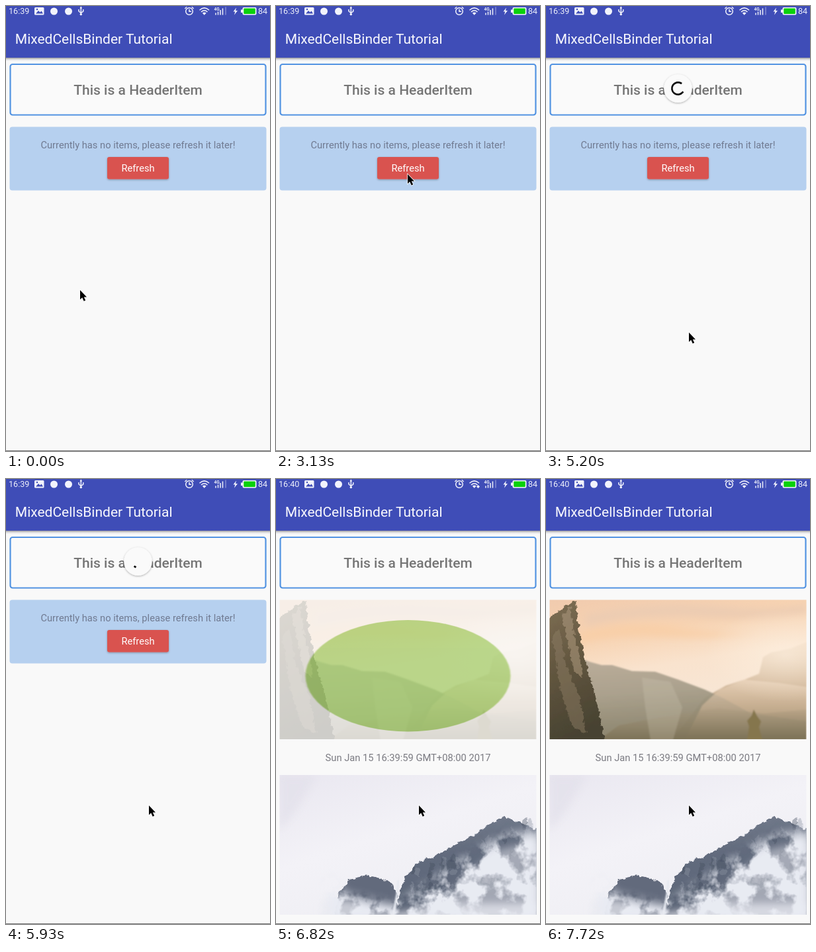
An HTML page for the animation above (8000 ms loop, 399x672 px).

```html
<!DOCTYPE html>
<html lang="en">
<head>
<meta charset="utf-8">
<title>List refresh</title>
<style>
  html, body { margin: 0; width: 100%; height: 100%; overflow: hidden; background: #f9f9f9; }
  svg { display: block; width: 100%; height: 100%; }
  text { font-family: Roboto, "Noto Sans", sans-serif; font-size: 14.7px; }
  .mid { text-anchor: middle; }
  .status text { font-size: 12.6px; fill: #eceefa; }
  .line { fill: none; stroke: #f2f3fc; stroke-width: 1.5; }
</style>
</head>
<body>
<svg viewBox="0 0 399 672">
  <defs>
    <linearGradient id="barShade" x2="0" y2="1">
      <stop stop-color="#8f8f96"/><stop offset=".4" stop-color="#d4d4d6"/><stop offset="1" stop-color="#f9f9f9"/>
    </linearGradient>
    <linearGradient id="sky" x2=".3" y2="1">
      <stop stop-color="#f1cbae"/><stop offset=".3" stop-color="#f7d3b2"/><stop offset=".55" stop-color="#f9e3ce"/><stop offset="1" stop-color="#f6e8da"/>
    </linearGradient>
    <linearGradient id="cliff" x2=".2" y2="1">
      <stop stop-color="#7f6f55"/><stop offset=".5" stop-color="#62563f"/><stop offset="1" stop-color="#474231"/>
    </linearGradient>
    <linearGradient id="ridge" x2=".2" y2="1">
      <stop stop-color="#b7aa98"/><stop offset=".45" stop-color="#a59c88"/><stop offset="1" stop-color="#827c64"/>
    </linearGradient>
    <linearGradient id="wall" x2="0" y2="1">
      <stop stop-color="#f2dcc5"/><stop offset=".4" stop-color="#d3b99c"/><stop offset="1" stop-color="#978769"/>
    </linearGradient>
    <linearGradient id="floor" x2="0" y2="1">
      <stop stop-color="#a39378" stop-opacity=".2"/><stop offset="1" stop-color="#7b7156"/>
    </linearGradient>
    <radialGradient id="glow">
      <stop stop-color="#fff3e4" stop-opacity=".6"/><stop offset="1" stop-color="#fff0de" stop-opacity="0"/>
    </radialGradient>
    <linearGradient id="mist" x2=".6" y2="1">
      <stop stop-color="#e9e7f0"/><stop offset=".5" stop-color="#f3f2f7"/><stop offset="1" stop-color="#eeeef3"/>
    </linearGradient>
    <linearGradient id="rock" x2=".2" y2="1">
      <stop stop-color="#767e8f"/><stop offset=".4" stop-color="#626b7d"/><stop offset="1" stop-color="#596375"/>
    </linearGradient>
    <filter id="soft1"><feGaussianBlur stdDeviation="1"/></filter>
    <filter id="soft6" x="-50%" y="-50%" width="200%" height="200%"><feGaussianBlur stdDeviation="6"/></filter>
    <filter id="rough">
      <feTurbulence type="fractalNoise" baseFrequency=".12" numOctaves="3" seed="4"/>
      <feDisplacementMap in="SourceGraphic" scale="9" xChannelSelector="R" yChannelSelector="G"/>
      <feGaussianBlur stdDeviation=".7"/>
    </filter>
    <filter id="wisps" color-interpolation-filters="sRGB">
      <feTurbulence type="fractalNoise" baseFrequency=".035" numOctaves="4" seed="9"/>
      <feColorMatrix values="0 0 0 0 .91  0 0 0 0 .92  0 0 0 0 .95  5 0 0 0 -1.9" result="noise"/>
      <feGaussianBlur in="SourceGraphic" stdDeviation="8"/>
      <feComposite in="noise" operator="in"/>
    </filter>
    <filter id="lift" x="-30%" y="-30%" width="160%" height="160%">
      <feDropShadow dx="0" dy="1" stdDeviation="1.4" flood-opacity=".32"/>
    </filter>
    <clipPath id="top"><rect x="5.5" y="182.5" width="388" height="210.5"/></clipPath>
    <clipPath id="low"><rect x="5.5" y="447" width="388" height="211"/></clipPath>
  </defs>

  <rect width="399" height="672" fill="#f9f9f9"/>
  <rect x="6.5" y="88" width="386" height="76.5" rx="3.5" fill="#fafafa" stroke="#5293e2" stroke-width="2.2"/>
  <text class="mid" x="199.5" y="134" fill="#757575" style="font-size:21px;font-weight:500">This is a HeaderItem</text>

  <g id="empty">
    <rect x="5.5" y="182.5" width="388" height="96" rx="4" fill="#b6d0ef"/>
    <text class="mid" x="199.5" y="215" fill="#707a91">Currently has no items, please refresh it later!</text>
    <rect x="153" y="228" width="93" height="33.5" rx="3" fill="#d9534f" filter="url(#lift)"/>
    <text class="mid" x="199.5" y="250.3" fill="#fff">Refresh</text>
  </g>

  <g id="items">
    <g clip-path="url(#top)">
      <g id="holder"><circle cx="199.5" cy="305" r="155" fill="#8fc54b" filter="url(#soft1)"/></g>
      <g id="valley">
        <rect x="5" y="182" width="389" height="212" fill="url(#sky)"/>
        <g filter="url(#soft6)">
          <path d="M60 205Q150 185 260 192Q330 200 394 190V203Q300 215 220 208Q130 205 60 222Z" fill="#ecccb2"/>
          <path d="M50 232Q120 212 200 224T330 232Q250 242 170 238T50 248Z" fill="#f9cfa6" opacity=".8"/>
        </g>
        <g filter="url(#soft1)">
          <path d="M394 246L370 256 340 262 328 269 322 294 300 303 272 312 240 330 190 394H394Z" fill="url(#wall)"/>
          <path d="M50 270L66 276 84 281 100 281 130 290 165 291 200 303 240 318 270 332 310 354 394 366V394H50Z" fill="url(#ridge)" opacity=".93"/>
          <path d="M210 394L236 342 262 318 300 303 352 308 394 314V394Z" fill="url(#wall)" opacity=".6"/>
          <path d="M80 394L110 372 160 362 215 352 260 346 330 354 394 348V394Z" fill="url(#floor)"/>
          <path d="M145 300L188 306 206 345 192 394H158L150 345Z" fill="#d2c9b6" opacity=".25"/>
          <path d="M304 394L307 374 304 365 311 357 314 348 319 358 325 366 322 375 327 394Z" fill="#85764e"/>
        </g>
        <g filter="url(#rough)">
          <path d="M0 212L18 201 31 190 45 183 47 214 54 250 62 284 76 334 90 400H0Z" fill="url(#cliff)"/>
          <path d="M24 206L38 192 41 225 50 262 56 300 43 290 31 240Z" fill="#a9947a" opacity=".6"/>
          <path d="M10 235L20 226 30 280 50 330 61 385 37 372 18 300Z" fill="#8c7c64" opacity=".5"/>
        </g>
        <ellipse cx="362" cy="266" rx="120" ry="70" fill="url(#glow)"/>
      </g>
    </g>
    <text class="mid" x="199.5" y="426.3" fill="#7b7b82">Sun Jan 15 16:39:59 GMT+08:00 2017</text>
    <g clip-path="url(#low)">
      <rect x="5" y="446" width="389" height="213" fill="url(#mist)"/>
      <path d="M5 447H60Q35 500 5 530Z" fill="#e2e0ea" opacity=".7" filter="url(#soft6)"/>
      <g filter="url(#rough)">
        <path d="M178 670L190 614 197 599 214 579 246 566 272 551 302 536 322 521 345 511 366 517 404 534V670Z" fill="url(#rock)"/>
        <path d="M86 670L96 622 110 606 132 599 151 601 170 608 182 622 184 670Z" fill="#626a7b"/>
        <g id="crags"></g>
      </g>
      <path d="M185 606L183 627 177 659" fill="none" stroke="#e6e9f0" stroke-width="3.2" filter="url(#soft1)"/>
      <g fill="#e9eaf0" filter="url(#soft6)">
        <path d="M285 600L335 560 400 545V670H225L262 634Z" opacity=".5"/>
        <path d="M70 640L112 634 138 652 190 654 240 642 400 640V670H70Z" opacity=".75"/>
      </g>
      <path d="M80 600L105 628 180 645 225 615 290 570 345 540 400 530V670H80Z" filter="url(#wisps)"/>
    </g>
  </g>

  <g id="spinner">
    <circle r="21.3" fill="#fafafa" filter="url(#lift)"/>
    <path id="arc" fill="none" stroke="#0c0c0c" stroke-width="2.7" stroke-linecap="square"/>
    <path id="tip" d="M0 -5.2V5.2L5.2 0Z" fill="#0c0c0c"/>
  </g>

  <rect y="78" width="399" height="5" fill="url(#barShade)"/>
  <rect width="399" height="78" fill="#3f4db7"/>
  <text x="13.8" y="57" fill="#f8f8fd" style="font-size:21px">MixedCellsBinder Tutorial</text>

  <g class="status">
    <text id="clock" x="4" y="12.4"></text>
    <rect x="43" y="2" width="14.5" height="11.5" rx="1.5" fill="#f2f3fc"/>
    <path d="M45 11.5L49 7 51.5 9.5 53.5 7.5 56 11.5Z" fill="#3f4db7"/>
    <circle cx="47" cy="5" r="1.2" fill="#3f4db7"/>
    <circle cx="72.5" cy="8" r="5.5" fill="#f2f3fc"/>
    <circle cx="94.5" cy="8" r="5.5" fill="#f2f3fc"/>
    <path class="line" d="M113.3 2V13M110 5V8L113.3 10.5 116.7 8V5"/>
    <path d="M111.3 3.5L113.3 .5 115.3 3.5Z" fill="#f2f3fc"/>
    <circle cx="113.3" cy="12.6" r="1.7" fill="#f2f3fc"/>
    <circle class="line" cx="277" cy="8" r="5.3"/>
    <path class="line" d="M277 4.8V8.3H280M270.3 4L273.2 1.5M283.7 4L280.8 1.5"/>
    <path class="line" d="M292.5 6.2Q299.7 -.5 307 6.2M295 9Q299.7 4.6 304.5 9"/>
    <path d="M296.8 10.6Q299.7 8.3 302.7 10.6L299.7 13.7Z" fill="#f2f3fc"/>
    <path id="traffic" d="M303 11.5L305.5 9 308 11.5 305.5 14Z" fill="#f2f3fc"/>
    <text x="314.5" y="6.8" style="font-size:6.5px;font-weight:700">4G</text>
    <path class="line" d="M317 13.5V10.5M320.5 13.5V8.5M324 13.5V6M327.5 13.5V3.5"/>
    <path class="line" d="M332 13.5V1.5" opacity=".4"/>
    <path d="M348 2.5L343.5 8.5H346.3L345 13.5 350 7H347Z" fill="#f2f3fc"/>
    <rect x="357.5" y="2" width="21" height="11.5" rx="2" fill="#f2f3fc"/>
    <rect x="355" y="5.5" width="3" height="4.5" fill="#f2f3fc"/>
    <rect x="359.3" y="3.5" width="17.5" height="8.5" rx="1" fill="#0bd10b"/>
    <text x="381" y="12.4">84</text>
  </g>

  <path id="cursor" d="M0 0V14.3L3.2 11.3 5.7 16.7 8.2 15.5 5.8 10.4H10Z"
        fill="#000" stroke="#fff" stroke-width="1.4" paint-order="stroke"/>
  <rect y="671" width="399" height="1" fill="#777"/>
</svg>

<script>
const LOOP = 8000;
const $ = id => document.getElementById(id);
const show = (id, on) => $(id).setAttribute('visibility', on ? 'inherit' : 'hidden');
const put = (id, value) => $(id).setAttribute('transform', value);

// [time, x, y] of the pointer tip
const POINTER = [
  [0, 112, 429], [450, 95, 327], [600, 166, 329], [750, 116, 288], [890, 193, 235],
  [1040, 201, 199], [1340, 200, 199], [2390, 200, 193], [2540, 199, 186], [2680, 199, 183],
  [3130, 199, 254], [3280, 203, 310], [3420, 210, 432], [3570, 216, 493]
];
// [first change, last change, number of changes]
const BURSTS = [[3130, 3570, 4], [3870, 4900, 8], [5050, 6080, 8], [6230, 6380, 2], [6680, 7120, 4]];
const TICKS = BURSTS.flatMap(([from, to, n]) =>
  Array.from({ length: n }, (_, i) => Math.floor((from + (to - from) * i / (n - 1)) / 10) * 10));

const REST_Y = 124.5, PULL = 67.5;
const SEEN = 3420, RELEASE = 3834, SETTLED = RELEASE + 200, SPIN = SETTLED + 666, CYCLE = 1332;
const ITEMS_AT = 6080, CLOCK_AT = 6230, GONE = 6380, FADE_AT = 6750;

const last = (rows, t) => rows.filter(row => row[0] <= t).pop();
const clamp = v => Math.min(1, Math.max(0, v));

// Cubic curve (.4, 0, .2, 1)
function ease(x) {
  let lo = 0, hi = 1;
  for (let i = 0; i < 20; i++) {
    const s = (lo + hi) / 2;
    const bx = 1.2 * s * (1 - s) ** 2 + .6 * s * s * (1 - s) + s ** 3;
    if (bx < x) lo = s; else hi = s;
  }
  return 3 * lo * lo * (1 - lo) + lo ** 3;
}

function arcPath(from, to, r = 9.2) {
  const at = a => [Math.cos(a * Math.PI / 180) * r, Math.sin(a * Math.PI / 180) * r].map(v => v.toFixed(2));
  return `M${at(from)}A${r} ${r} 0 ${to - from > 180 ? 1 : 0} 1 ${at(to)}`;
}

// How far the indicator is pulled past its resting place, 0 to 1
const stretch = t => t < 3570 ? .25 : (1 - clamp((t - RELEASE) / 200)) ** 4;

// The pulled ring closes up on its head before it starts to cycle.
function closingArc(t) {
  const u = clamp((t - SETTLED) / (SPIN - SETTLED));
  const grip = .075 + .5 * stretch(Math.min(t, RELEASE));
  const turn = grip + (1 - grip) * u;
  return [360 * (.8 * u + turn), 360 * (.8 + turn) + 1];
}

function spinArc(t) {
  const phase = (t - SPIN) / CYCLE;
  const n = Math.floor(phase), u = phase - n;
  const base = 288 + 576 * n + 306 * u;
  return [base + 270 * ease(clamp(2 * u - 1)), base + 270 * ease(clamp(2 * u)) + 1];
}

function drawSpinner(t) {
  const pulled = t < SPIN;
  const [from, to] = pulled ? closingArc(t) : spinArc(t);
  show('spinner', t >= SEEN && t < GONE);
  put('spinner', `translate(199.5 ${REST_Y + PULL * stretch(t)}) scale(${t < CLOCK_AT ? 1 : .4})`);
  $('arc').setAttribute('d', arcPath(from, to));
  if (pulled) put('tip', `rotate(${to}) translate(9.2 0) rotate(90)`);
  show('tip', pulled);
}

function draw(now) {
  const time = now % LOOP;
  const t = TICKS.filter(v => v <= time).pop() ?? 0;
  const [, x, y] = last(POINTER, time);
  put('cursor', `translate(${x} ${y})`);
  drawSpinner(t);

  show('empty', t < ITEMS_AT);
  show('items', t >= ITEMS_AT);
  const fade = clamp((t - FADE_AT) / 300);
  $('valley').setAttribute('opacity', fade);
  $('holder').setAttribute('opacity', 1 - fade);
  put('holder', `translate(0 288) scale(1 ${fade ? .543 : 1}) translate(0 -288)`);

  $('clock').textContent = t < CLOCK_AT ? '16:39' : '16:40';
  show('traffic', time >= 6680 && time < 7720);
}

function seeded(seed) {
  return () => (seed = seed * 16807 % 2147483647) / 2147483647;
}

const rand = seeded(71);
$('crags').innerHTML = Array.from({ length: 80 }, (_, i) => {
  const x = 205 + rand() * 185;
  const y = 592 - (x - 205) * .42 + rand() * 70;
  return `<ellipse cx="${x}" cy="${y}" rx="${2 + rand() * 3}" ry="${4 + rand() * 7}"
    fill="${i % 2 ? '#444e60' : '#8b93a2'}" opacity=".4"/>`;
}).join('');

function tick() {
  draw(performance.now());
  requestAnimationFrame(tick);
}
tick();
</script>
</body>
</html>
```
